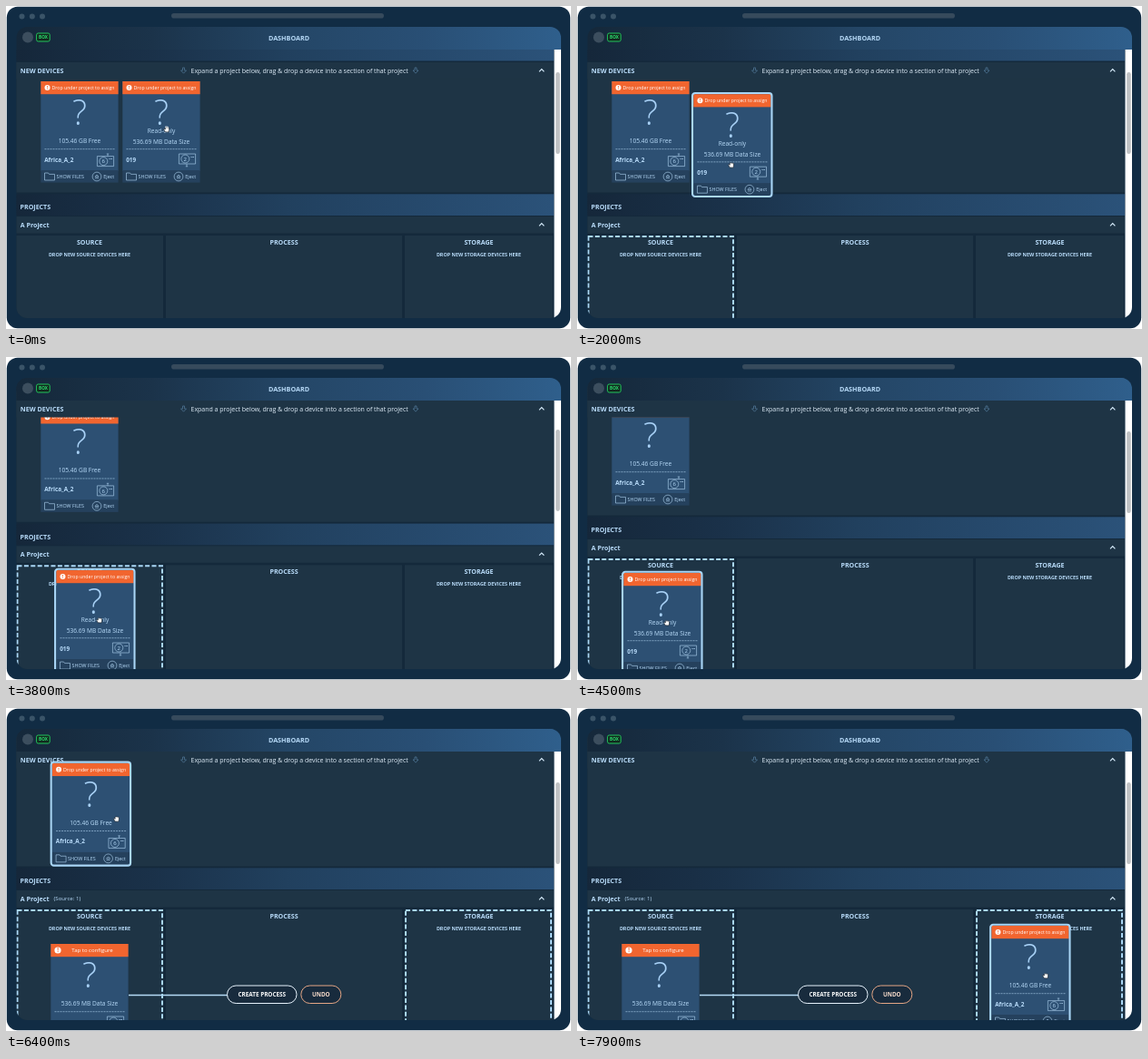
An HTML page that plays this animation: 622x356 px, repeating every 8 s.

```html
<!DOCTYPE html>
<html lang="en">
<head>
<meta charset="utf-8">
<title>Dashboard drag and drop</title>
<style>
html, body { margin: 0; width: 100%; height: 100%; overflow: hidden; background: #fff; }
svg { display: block; width: 622px; height: 356px; }
text { font-family: "Open Sans", "Noto Sans", sans-serif; fill: #b9dcfa; white-space: pre; }
.b { font-weight: 700; }
.w { fill: #fff; }
.mid { text-anchor: middle; }
.line { fill: none; stroke: #a9cdea; stroke-width: .65; }
.zone { fill: none; stroke: #a9d6f5; stroke-width: 2; stroke-dasharray: 5 2.4; }
</style>
</head>
<body>
<svg id="stage" viewBox="0 0 622 356"></svg>
<script>
const PANEL = '#1e3445', GAP = '#14293b', ORANGE = '#f1652f';

const rect = (x, y, w, h, fill, more = '') =>
  `<rect x="${x}" y="${y}" width="${w}" height="${h}" fill="${fill}" ${more}/>`;
const circle = (x, y, r, fill, more = '') =>
  `<circle cx="${x}" cy="${y}" r="${r}" fill="${fill}" ${more}/>`;
const path = (d, more = 'class="line"') => `<path d="${d}" ${more}/>`;
// y is the middle of the capitals
const text = (x, y, size, str, cls = '', more = '') =>
  `<text x="${x}" y="${y + size * .36}" font-size="${size}" class="${cls}" ${more}>${str}</text>`;
const gradient = (id, ...colors) => `<linearGradient id="${id}">` + colors.map((c, i) =>
  `<stop offset="${i / (colors.length - 1)}" stop-color="${c}"/>`).join('') + '</linearGradient>';
const chevron = y => path(`M587 ${y + 1.4}l2.7-2.7 2.7 2.7`, 'fill="none" stroke="#d5eafa" stroke-width="1.2"');
const arrow = x => path(`M${x - 1} 68v3h-2l3 3.2 3-3.2h-2v-3z`, 'fill="none" stroke="#547c9c" stroke-width=".7"');
const alertMark = (x, r) => circle(x, 7, r, '#fff') +
  text(x, 7, r * 1.7, '!', 'b mid', `style="fill:${ORANGE}"`);

function slotIcon(digit, flip) {
  const y = flip ? 80 : 82.6;
  return path(`M62.4 ${y}h18.2v11h-18.2z`) + circle(69.3, y + 5.5, 4.5, 'none', 'class="line"') +
    path(flip ? 'M71 91v2.8M69.8 93.8h2.4' : 'M74 82.6v-2.6M72.8 80h2.4') +
    text(69.3, y + 5.5, 6, digit, 'mid') + text(77.2, y + 3, 2.4, 'MB', 'b mid');
}

function card({ id, name, size, digit, flip, readOnly, done }) {
  const label = done
    ? alertMark(8, 3.6) + text(46, 6.8, 6.05, 'Tap to configure', 'w mid')
    : alertMark(7.5, 3) + text(12.5, 7, 5.2, 'Drop under project to assign', 'w');
  return `<g id="${id}">` +
    rect(.3, 0, 85.3, 99, '#2d5073') + rect(.3, 98, 85.3, 13.6, '#25415d') +
    rect(.3, 0, 85.3, 14.2, ORANGE) + label +
    text(43, 34.4, 38, '?', 'mid', 'font-weight="300" style="fill:#a8d1f6"') +
    (readOnly ? text(43, 54.7, 6.55, 'Read-only', 'mid') : '') +
    text(43, done || !flip ? 65.4 : 66.8, 6.6, size, 'mid') +
    path('M4.5 74.7h77', 'class="line" stroke-dasharray="2 1"') +
    text(4.2, 86.3, 6.4, name, 'b') + slotIcon(digit, flip) +
    path('M4.5 109v-8h4l1 1.4h6v6.6z') + text(17.5, 105, 5.4, 'SHOW FILES') +
    circle(62, 105, 4.9, 'none', 'class="line"') +
    path('M60 105.2l2-2.2 2 2.2zM60 106.8h4') + text(69.3, 105, 5.4, 'Eject') +
    rect(-.9, -1.2, 87.4, 114, 'none', 'rx="3" class="edge" stroke="#a9d6f7" stroke-width="2.1"') + '</g>';
}

const column = (x, w, title, hint = '') => rect(x, 253, w, 150, PANEL) +
  text(x + w / 2, 260, 7.1, title, 'b mid') + text(x + w / 2, 273.6, 5.4, hint, 'b mid');
const button = (x, w, label, stroke, color) =>
  rect(x, 337, w, 19.5, '#182b3d', `rx="9.7" stroke="${stroke}"`) +
  text(x + w / 2, 346.8, 6.38, label, 'b mid', `style="fill:${color}"`);

const page = `<g id="page">` +
  rect(11, 48, 592, 400, GAP) + rect(11, 48, 592, 12.5, 'url(#band)') +
  rect(11, 62, 592, 143.5, PANEL) +
  rect(11, 207.3, 592, 23.7, 'url(#band)') + text(15.5, 221.7, 7.1, 'PROJECTS', 'b') +
  rect(11, 232, 592, 18.5, PANEL) + text(15.8, 241, 7.1, 'A Project', 'b') + chevron(241) +
  column(11, 162, 'SOURCE', 'DROP NEW SOURCE DEVICES HERE') + column(176, 260, 'PROCESS') +
  column(439, 163, 'STORAGE', 'DROP NEW STORAGE DEVICES HERE') +
  `<g id="assigned">` + text(52.5, 241.2, 6.1, '(Source: 1)') +
  path('M135 347.5h109', 'stroke="#b5daf5" stroke-width="1.3"') +
  button(243.5, 76.5, 'CREATE PROCESS', '#e6f2fc', '#fff') +
  button(324.8, 44, 'UNDO', '#e5a685', '#f8dccb') +
  `<g transform="translate(49 291)">` +
  card({ id: 'placed', name: '019', size: '536.69 MB Data Size', digit: 2, flip: true, done: true }) + '</g></g>' +
  `<rect id="zoneA" class="zone" x="12.5" y="254" width="159.5" height="150"/>` +
  `<rect id="zoneB" class="zone" x="440" y="254" width="160" height="150"/></g>`;

const stage = document.getElementById('stage');
stage.innerHTML = '<defs>' + gradient('bar', '#15283a', '#1b334a', '#244666', '#294f75', '#2f5f8c') +
  gradient('band', '#15273a', '#1a3149', '#21405e', '#26496c', '#2b5279') +
  '<clipPath id="view"><rect x="11.5" y="23" width="599.5" height="321" rx="12"/></clipPath></defs>' +
  rect(.8, .8, 620.4, 354.4, '#112c44', 'rx="12"') +
  [17.5, 28.8, 40].map(x => circle(x, 11.5, 3, '#3a5468')).join('') +
  rect(182, 8, 234, 5.6, '#364a5c', 'rx="2.8"') +
  `<g clip-path="url(#view)">` + page + '<g id="list">' +
  card({ id: 'first', name: 'Africa_A_2', size: '105.46 GB Free', digit: 6 }) +
  card({ id: 'second', name: '019', size: '536.69 MB Data Size', digit: 2, flip: true, readOnly: true }) + '</g>' +
  `<g id="head">` + rect(11, 62, 592, 18.5, PANEL) + text(15.8, 71.3, 7.2, 'NEW DEVICES', 'b') + arrow(195.5) +
  text(203.5, 71, 6.99, 'Expand a project below, drag &amp; drop a device into a section of that project', '', 'style="fill:#e0eefa"') +
  arrow(451) + chevron(71) + '</g>' +
  rect(603.5, 48, 8, 300, '#fff') + `<rect id="thumb" x="605.2" width="4.6" height="90" rx="2.3" fill="#bfc1c3"/>` +
  rect(11, 23, 601, 25, 'url(#bar)') + circle(24, 34.5, 6, '#3c4e5e') +
  rect(33.6, 30, 14.6, 9, '#12291f', 'rx="1.8" stroke="#22c55c"') +
  text(41, 34.5, 4.7, 'BOX', 'b mid', 'style="fill:#2be070"') +
  text(311.5, 35, 7.2, 'DASHBOARD', 'b mid') + '<g id="top"></g><g id="cursor">' +
  path('M-2 2.8L-3.3-.2q.3-.9 1.1-.2l.5.5V-2q.5-.9 1 0 .5-1 1.1 0 .6-.8 1.1.1.7-.5 1.1.3V1L2 3z',
    'fill="#fff" stroke="#1a2430" stroke-width=".7"') +
  `<path id="fingers" d="M-1.2-1.8v-1.6M0-1.8v-1.8M1.2-1.6v-1.5" stroke="#fff" stroke-width=".9"/></g></g>`;

const el = Object.fromEntries([...stage.querySelectorAll('[id]')].map(e => [e.id, e]));
const move = (e, x, y) => e.setAttribute('transform', `translate(${x} ${y})`);
const show = (e, on) => e.setAttribute('display', on ? 'inline' : 'none');
show(el.placed.querySelector('.edge'), false);

// keys are [time, ...values]
function track(keys, t) {
  const i = keys.findIndex(k => k[0] > t);
  if (i === 0) return keys[0].slice(1);
  if (i < 0) return keys[keys.length - 1].slice(1);
  const a = keys[i - 1], b = keys[i], u = (t - a[0]) / (b[0] - a[0]);
  return a.slice(1).map((v, n) => v + (b[n + 1] - v) * u);
}

const LIFT_2 = 1850, DROP_2 = 4600, LIFT_1 = 6350;
const scrollKeys = [[3200, 0], [3800, 23.7], [4150, 31]];
const secondKeys = [[LIFT_2, 128, 83], [2000, 128, 97], [2300, 112, 148], [2600, 92, 196], [2900, 80, 221.6],
  [3300, 65, 231], [3800, 55, 235], [4300, 51, 238]];
const firstKeys = [[LIFT_1, 38, 52], [6500, 75, 78], [6800, 226, 156], [7100, 354, 210], [7400, 426, 232],
  [7700, 452, 239], [7900, 456, 240]];
const cursorKeys = [[1750, 177, 136], [2000, 170, 175], [2300, 151, 222], [2600, 134, 260], [2900, 123, 283],
  [3300, 110, 288], [3800, 103, 290], [4300, 99, 293], [4750, 99, 293], [5100, 95, 180], [5400, 93, 104],
  [6300, 93, 104], [6500, 150, 140], [6800, 310, 219], [7100, 436, 269], [7400, 494, 290],
  [7700, 513, 295], [7900, 516, 295]];

function place(node, held, [x, y]) {
  const parent = held ? el.top : el.list;
  if (node.parentNode !== parent) parent.append(node);
  show(node.querySelector('.edge'), held);
  move(node, x, y);
}

function draw(t) {
  const [scroll] = track(scrollKeys, t);
  const hold2 = t >= LIFT_2 && t < DROP_2, hold1 = t >= LIFT_1;
  move(el.page, 0, -scroll);
  move(el.head, 0, -Math.min(scroll, 14));
  el.thumb.setAttribute('y', 73 + scroll * .29);
  place(el.first, hold1, hold1 ? track(firstKeys, t) : [38, 83 - scroll]);
  place(el.second, hold2, track(secondKeys, t));
  show(el.second, t < DROP_2);
  show(el.assigned, t >= DROP_2);
  show(el.zoneA, hold2 || hold1);
  show(el.zoneB, hold1);
  move(el.cursor, ...track(cursorKeys, t));
  show(el.fingers, !hold1 && !hold2);
}

const start = performance.now();
function tick() {
  draw((performance.now() - start) % 8000);
  requestAnimationFrame(tick);
}
tick();
</script>
</body>
</html>
```
